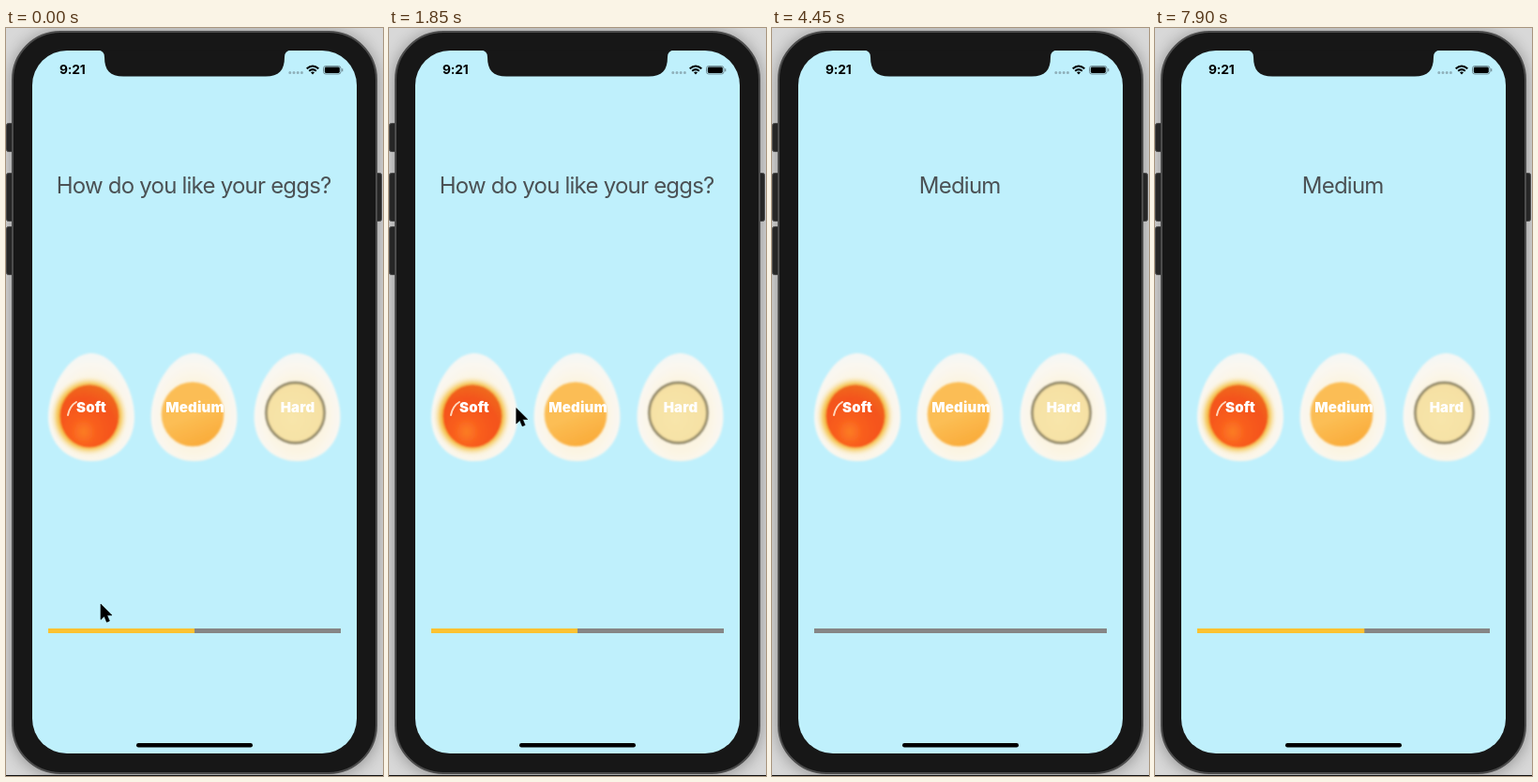
An HTML page that plays this animation: 402x796 px, repeating every 8 s.

```html
<!DOCTYPE html>
<html lang="en">
<head>
<meta charset="utf-8">
<title>Egg timer</title>
<style>
  html, body { margin: 0; width: 100%; height: 100%; overflow: hidden; background: #d8d8d8; }
  svg { display: block; width: 402px; height: 796px; font-family: Inter, "Open Sans", sans-serif; }
  #title { font-size: 24px; letter-spacing: -.78px; fill: #4b5154; text-anchor: middle; }
  .label { font-size: 15px; font-weight: 900; letter-spacing: .2px; fill: #fff; text-anchor: middle; }
</style>
</head>
<body>
<svg viewBox="0 0 402 796">
  <defs>
    <filter id="shade" x="-20%" y="-20%" width="140%" height="140%"><feGaussianBlur stdDeviation="9"/></filter>
    <filter id="blur" x="-20%" y="-20%" width="140%" height="140%"><feGaussianBlur stdDeviation=".8"/></filter>
    <radialGradient id="white" cy=".58" r=".55">
      <stop offset=".6" stop-color="#fbf4e2"/><stop offset=".85" stop-color="#faf7f0"/>
      <stop offset="1" stop-color="#f6f7f4"/>
    </radialGradient>
    <radialGradient id="glow">
      <stop offset=".7" stop-color="#efa51c"/><stop offset=".82" stop-color="#f6cb62" stop-opacity=".9"/>
      <stop offset="1" stop-color="#faf3de" stop-opacity="0"/>
    </radialGradient>
    <radialGradient id="soft" cx=".4" cy=".75" r=".75">
      <stop offset="0" stop-color="#fc7d25"/><stop offset=".3" stop-color="#f95e1d"/>
      <stop offset=".7" stop-color="#f4531d"/><stop offset="1" stop-color="#f06a20"/>
    </radialGradient>
    <linearGradient id="medium" x1=".3" x2=".7" y2="1">
      <stop offset="0" stop-color="#fbbd55"/><stop offset=".5" stop-color="#fcbe55"/>
      <stop offset="1" stop-color="#f9aa38"/>
    </linearGradient>
    <radialGradient id="hard" cx=".45" cy=".6" r=".6">
      <stop offset="0" stop-color="#f8e5aa"/><stop offset="1" stop-color="#f5e0a3"/>
    </radialGradient>
    <path id="egg" d="M0 346C24 346 46 383 46 414C46 442 26 461 0 461S-46 442-46 414C-46 383-24 346 0 346Z" fill="url(#white)" filter="url(#blur)"/>
  </defs>

  <!-- phone -->
  <rect width="402" height="796" fill="#d8d8d8"/>
  <rect x="7" y="5" width="388" height="790" rx="51" opacity=".38" filter="url(#shade)"/>
  <path d="M0 795.5H402" stroke="#111"/>
  <g fill="#262626" stroke="#4a4a4a">
    <rect x=".5" y="101.5" width="9" height="30" rx="2"/>
    <rect x=".5" y="154.5" width="9" height="51" rx="2"/>
    <rect x=".5" y="211.5" width="9" height="51" rx="2"/>
    <rect x="392" y="154.5" width="8.5" height="51" rx="2"/>
  </g>
  <rect x="7" y="4" width="388" height="789" rx="51" fill="#171717" stroke="#4c4c4c" stroke-width="2"/>
  <rect x="28" y="24" width="346" height="748" rx="37" fill="#bff0fc"/>
  <path d="M98 23.5Q105 24 105 31C105 45 111 51.5 125 51.5H277C291 51.5 297 45 297 31Q297 24 304 23.5Z" fill="#171717"/>

  <!-- status bar -->
  <text x="57" y="49.3" font-size="13.8" font-weight="650" letter-spacing="-.2">9:21</text>
  <path d="M302.8 47.5H317" stroke="#8fb0ba" stroke-width="3" stroke-linecap="round" stroke-dasharray="0 4.2"/>
  <path d="M320.7 43.3Q327 37.6 333.3 43.3M323.2 45.8Q327 42.4 330.8 45.8" fill="none" stroke="#000" stroke-width="2"/>
  <path d="M327 49.5L325 47.3Q327 45.8 329 47.3Z"/>
  <rect x="338.5" y="40.5" width="18.5" height="8.5" rx="2.4" fill="none" stroke="#6f8a93"/>
  <rect x="339.8" y="41.6" width="16" height="6.4" rx="1.4"/>
  <path d="M358.7 43.3V46.3" stroke="#6f8a93" stroke-width="1.2"/>

  <text id="title" x="200.2" y="176"></text>

  <!-- eggs -->
  <use href="#egg" x="91"/><use href="#egg" x="200.5"/><use href="#egg" x="310.5"/>
  <g filter="url(#blur)">
    <ellipse cx="88.5" cy="413" rx="42" ry="43" fill="url(#glow)"/>
    <ellipse cx="89" cy="413" rx="31.5" ry="33.5" fill="url(#soft)"/>
    <ellipse cx="199" cy="411" rx="33.3" ry="34.3" fill="url(#medium)"/>
    <ellipse cx="308.5" cy="409.5" rx="31" ry="32" fill="url(#hard)" stroke="#82795a" stroke-width="2.4"/>
  </g>
  <path d="M66 412Q68 402 75 398" fill="none" stroke="#ffd9bd" stroke-width="2" stroke-linecap="round"/>
  <text class="label" x="91" y="409">Soft</text>
  <text class="label" x="201.5" y="409">Medium</text>
  <text class="label" x="311" y="409">Hard</text>

  <!-- progress and home bar -->
  <rect x="45" y="639" width="312" height="5" fill="#868686"/>
  <rect id="bar" x="45" y="639" height="5" fill="#fcc231"/>
  <rect x="139" y="761" width="124" height="4.4" rx="2.2"/>

  <path id="cursor" d="M0 0V16.5L3.8 13L6.4 19.2L9.4 18L6.8 11.9H12Z" stroke="#000" stroke-width=".6" stroke-linejoin="round"/>
</svg>
<script>
const LOOP = 8000, TAP = 3500, BOIL = 7, BAR = 312;
// cursor stops: time, x, y
const path = [[50, 101, 613], [950, 80, 399], [1450, 80, 399], [2200, 181, 409], [3700, 181, 409], [4250, 12, 640]];
const [title, bar, cursor] = ['title', 'bar', 'cursor'].map(id => document.getElementById(id));
const ease = u => u * u * (3 - 2 * u);

function cursorAt(t) {
  const i = path.findIndex(p => p[0] > t);
  if (i < 0) return null;
  if (i === 0) return path[0].slice(1);
  const [t0, x0, y0] = path[i - 1], [t1, x1, y1] = path[i];
  const u = ease((t - t0) / (t1 - t0));
  return [x0 + (x1 - x0) * u, y0 + (y1 - y0) * u];
}

function draw(t) {
  const tapped = t >= TAP;
  title.textContent = tapped ? 'Medium' : 'How do you like your eggs?';
  const share = tapped ? Math.floor((t - TAP) / 1000) / BOIL : .5;
  bar.setAttribute('width', BAR * share);
  const at = cursorAt(t);
  cursor.setAttribute('visibility', at ? 'visible' : 'hidden');
  if (at) cursor.setAttribute('transform', `translate(${at})`);
}

const start = performance.now();
function tick() {
  draw((performance.now() - start) % LOOP);
  requestAnimationFrame(tick);
}
tick();
</script>
</body>
</html>
```
